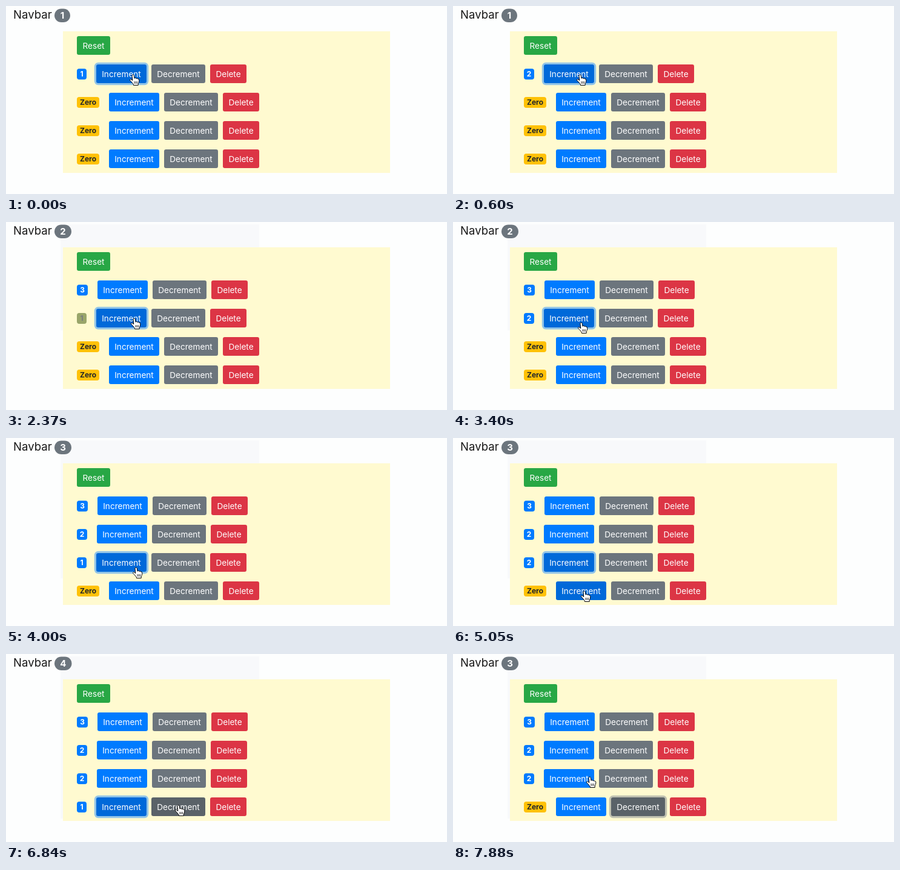
Write an HTML page that moves like this. It is 728x312 px and loops after 8 s.

```html
<!DOCTYPE html>
<html lang="en">
<head>
<meta charset="utf-8">
<title>Counters</title>
<style>
  html, body { margin: 0; width: 100%; height: 100%; overflow: hidden; background: #fdfefe; }
  svg { display: block; width: 728px; height: 312px; font-family: Inter, "Open Sans", sans-serif; }
  .label { font-size: 13.6px; fill: #fff; text-anchor: middle; }
  .badge { font-size: 12px; font-weight: 700; text-anchor: middle; }
  .brand { font-size: 18.6px; fill: #191919; }
  .total { font-size: 15px; font-weight: 700; fill: #fff; text-anchor: middle; }
</style>
</head>
<body>
<svg id="stage" viewBox="0 0 728 312"></svg>
<script>
const LOOP = 8000;
const BUTTONS = [
  { label: 'Increment', width: 83, fill: '#007bff', dark: '#0069d9', ring: 'rgba(38,143,255,.5)' },
  { label: 'Decrement', width: 89, fill: '#6c757d', dark: '#5a6268', ring: 'rgba(130,138,145,.5)' },
  { label: 'Delete', width: 60, fill: '#dc3545' }
];
const BLUE = [0, 123, 255], YELLOW = [255, 193, 7], INK = [33, 37, 41], WHITE = [255, 255, 255];
const ROW_TOP = 97, ROW_PITCH = 47, BUTTON_HEIGHT = 31;

// Each step overrides part of the state before it.
const STEPS = [
  [0, { counts: [1, 0, 0, 0], total: 1, focus: [0, 0], hover: [0, 0], cursor: [210, 114], shade: 0, fade: 1 }],
  [450, { counts: [2, 0, 0, 0] }],
  [1190, { counts: [3, 0, 0, 0] }],
  [1340, { cursor: [210, 115] }],
  [1490, { cursor: [210, 118] }],
  [1630, { cursor: [210, 121] }],
  [1780, { cursor: [210, 132] }],
  [1930, { cursor: [211, 146], hover: [1, 0] }],
  [2080, { cursor: [212, 155] }],
  [2230, { cursor: [212, 160], focus: [1, 0] }],
  [2370, { counts: [3, 1, 0, 0], total: 2, shade: 180, fade: .4 }],
  [2520, { fade: 1 }],
  [2960, { counts: [3, 2, 0, 0] }],
  [3110, { cursor: [212, 162] }],
  [3260, { cursor: [212, 167] }],
  [3410, { cursor: [213, 183] }],
  [3550, { cursor: [214, 208], hover: [2, 0] }],
  [3700, { cursor: [215, 215], focus: [2, 0] }],
  [3850, { counts: [3, 2, 1, 0], total: 3, shade: 233, fade: .6 }],
  [4000, { fade: 1 }],
  [4750, { counts: [3, 2, 2, 0] }],
  [4900, { cursor: [216, 232] }],
  [5050, { cursor: [217, 254], hover: [3, 0] }],
  [5350, { focus: [3, 0] }],
  [5500, { counts: [3, 2, 2, 1], total: 4, shade: 273, fade: .75 }],
  [5650, { fade: 1 }],
  [6100, { cursor: [224, 254] }],
  [6250, { cursor: [247, 253] }],
  [6400, { cursor: [276, 252], hover: [3, 1] }],
  [6540, { cursor: [285, 251] }],
  [6990, { counts: [3, 2, 2, 0], total: 3, focus: [3, 1], fade: .6 }],
  [7130, { fade: 1 }],
  [7730, { cursor: [254, 230] }],
  [7880, { cursor: [226, 204] }]
];

const rect = (x, y, w, h, r, fill) =>
  `<rect x="${x}" y="${y}" width="${w}" height="${h}" rx="${r}" fill="${fill}"/>`;
const text = (cls, x, y, str, fill) =>
  `<text class="${cls}" x="${x}" y="${y}"${fill ? ` fill="${fill}"` : ''}>${str}</text>`;
const mix = (a, b, p) => `rgb(${a.map((v, i) => Math.round(v + (b[i] - v) * p))})`;
const same = (a, b) => a[0] === b[0] && a[1] === b[1];

function button(x, y, width, label, fill, ring) {
  const halo = ring ? rect(x - 3.2, y - 3.2, width + 6.4, BUTTON_HEIGHT + 6.4, 6.4, ring) : '';
  return halo + rect(x, y, width, BUTTON_HEIGHT, 3.2, fill) + text('label', x + width / 2, y + 21, label);
}

function counterRow(state, row) {
  const count = state.counts[row], y = ROW_TOP + row * ROW_PITCH;
  const badgeWidth = count ? 15 + count : 37;
  const blueness = row === state.focus[0] ? state.fade : 1;
  const p = count ? blueness : 1 - blueness;
  let out = rect(117, y + 7, badgeWidth, 18, 4, mix(YELLOW, BLUE, p)) +
    text('badge', 117 + badgeWidth / 2, y + 20, count || 'Zero', mix(INK, WHITE, p));
  let x = 117 + badgeWidth + 16;
  BUTTONS.forEach((b, i) => {
    const focused = same(state.focus, [row, i]);
    const dark = focused || same(state.hover, [row, i]);
    out += button(x, y, b.width, b.label, dark ? b.dark : b.fill, focused && b.ring);
    x += b.width + 8;
  });
  return out;
}

function pointer([x, y]) {
  const inGap = (y - ROW_TOP) % ROW_PITCH > BUTTON_HEIGHT;
  const shape = inGap
    ? '<path d="M0 0V15L3.5 11.8L6 17L8.2 16L6 11H10.5Z" fill="#000" stroke="#fff"/>'
    : `<path d="M-2 2C-2.2-.5 1-.7 1.4 1.6L2 6.2C2.6 4.8 5 5 5.2 6.6C6 5.6 7.8 6 8 7.4C8.8 6.8 10 7.4 9.8 9.2
       C9.8 12 9 13 8.2 15V17.5H.4V16.2C-1.4 13.8-2.6 12-5 9.8C-6.4 8.4-4.6 6.8-3 8L-1.2 9.6Z" fill="#fff" stroke="#000"/>
       <path d="M2 11V15M4.2 11V15M6.4 11V15" stroke="#000" stroke-width=".8"/>`;
  return `<g transform="translate(${x} ${y})" stroke-linejoin="round">${shape}</g>`;
}

function draw(state) {
  const pillWidth = state.total === 1 ? 26 : state.total === 4 ? 28.5 : 28;
  return rect(0, 0, 728, 312, 0, '#fdfefe') +
    (state.shade ? rect(90, 4, 328, state.shade - 4, 0, '#f8f9fb') : '') +
    rect(94, 42, 540, 235, 0, '#fffad0') +
    text('brand', 12, 21, 'Navbar') +
    rect(80, 4.5, pillWidth, 22.5, 11.25, '#6c757d') +
    text('total', 80 + pillWidth / 2, 21, state.total) +
    button(117, 50, 55, 'Reset', '#28a745') +
    state.counts.map((_, row) => counterRow(state, row)).join('') +
    pointer(state.cursor);
}

const stage = document.getElementById('stage');
const start = performance.now();
let shown = -1;

function tick(now) {
  const t = Math.max(0, now - start) % LOOP;
  const past = STEPS.filter(([at]) => at <= t);
  if (past.length !== shown) {
    shown = past.length;
    stage.innerHTML = draw(Object.assign({}, ...past.map(([, change]) => change)));
  }
  requestAnimationFrame(tick);
}
tick(start);
</script>
</body>
</html>
```
